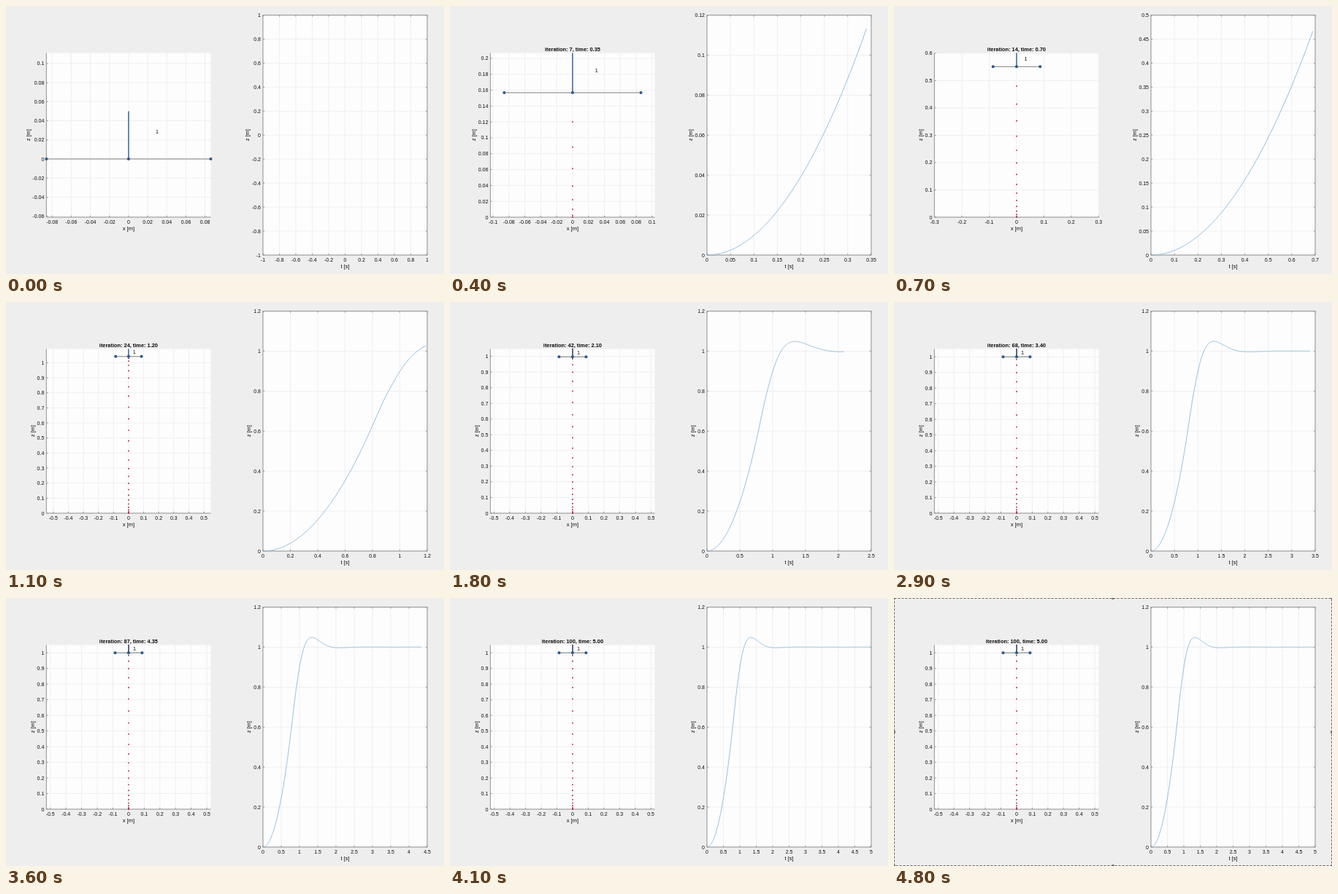
These frames come from a looping animation (600 px wide and 368 px high, 4900 ms). An HTML page with a canvas:

```html
<!DOCTYPE html>
<html lang="en">
<head>
<meta charset="utf-8">
<style>
  html, body { margin: 0; width: 100%; height: 100%; overflow: hidden; background: #eeeeef; }
  canvas { display: block; }
</style>
</head>
<body>
<canvas id="stage" width="600" height="368"></canvas>
<script>
const ctx = document.getElementById('stage').getContext('2d');
const FONT = '"Liberation Sans", Arial, sans-serif';
const DT = 0.05, ARM = 0.086, THRUST = 0.05;
const LEFT = { x0: 55.3, x1: 280.5, y0: 64.5, y1: 290 };
const RIGHT = { x0: 352, x1: 577, y0: 12.5, y1: 342 };

// [picture index, simulation iteration]
const PACE = [[0, 0], [4, 7], [11, 24], [18, 42], [29, 68], [36, 87], [41, 100], [49, 100]];

function iterationAt(i) {
  const k = PACE.findIndex(p => p[0] > i);
  const [a, n] = PACE[k - 1], [b, m] = PACE[k];
  return Math.round(n + (m - n) * (i - a) / (b - a));
}

// Constant thrust first, then a damped swing around 1 m.
function height(t) {
  const climb = 0.98 * t * t;
  const s = 3.4, w = 4.2, d = t - 1.34;
  const settle = 1 + 0.0485 * Math.exp(-s * d) * (Math.cos(w * d) + s / w * Math.sin(w * d));
  const u = Math.min(1, Math.max(0, (t - 0.8) / 0.15));
  const mix = u * u * (3 - 2 * u);
  return climb * (1 - mix) + settle * mix;
}

function niceStep(min) {
  const p = 10 ** Math.floor(Math.log10(min) + 1e-9);
  return [1, 2, 5, 10].map(m => m * p).find(v => v >= min * (1 - 1e-9));
}

function ticks(lo, hi, step) {
  const list = [];
  for (let k = Math.ceil(lo / step - 1e-6); k <= hi / step + 1e-6; k++) list.push(k * step);
  return list;
}

function line(x0, y0, x1, y1, color, width = 1) {
  ctx.strokeStyle = color;
  ctx.lineWidth = width;
  ctx.beginPath();
  ctx.moveTo(x0, y0);
  ctx.lineTo(x1, y1);
  ctx.stroke();
}

function dot(x, y, r, color) {
  ctx.fillStyle = color;
  ctx.beginPath();
  ctx.arc(x, y, r, 0, 7);
  ctx.fill();
}

function text(str, x, y, align = 'center', size = 7, weight = '') {
  ctx.font = `${weight} ${size}px ${FONT}`;
  ctx.textAlign = align;
  ctx.fillStyle = '#0c0c0c';
  ctx.fillText(str, x, y);
}

function drawAxes(box, xlim, ylim, xStep, yStep, xName, boxed) {
  const { x0, x1, y0, y1 } = box;
  const X = v => x0 + (v - xlim[0]) / (xlim[1] - xlim[0]) * (x1 - x0);
  const Y = v => y1 - (v - ylim[0]) / (ylim[1] - ylim[0]) * (y1 - y0);
  const xs = ticks(...xlim, xStep), ys = ticks(...ylim, yStep);
  const ink = '#868686', grid = '#efeff1';
  const tiny = ylim[1] < 0.0099 && boxed;
  const format = v => String(+v.toFixed(4) || 0);

  ctx.fillStyle = '#fdfdfe';
  ctx.fillRect(x0, y0, x1 - x0, y1 - y0);
  xs.forEach(v => line(X(v), y0, X(v), y1, grid));
  ys.forEach(v => line(x0, Y(v), x1, Y(v), grid));
  line(x0, y0, x0, y1, ink, 0.9);
  line(x0, y1, x1, y1, ink, 0.9);
  if (boxed) {
    line(x0, y0, x1, y0, ink, 0.9);
    line(x1, y0, x1, y1, ink, 0.9);
  }

  let widest = 0;
  for (const v of xs) {
    line(X(v), y1, X(v), y1 - 2.3, ink, 0.8);
    if (boxed) line(X(v), y0, X(v), y0 + 2.3, ink, 0.8);
    text(format(v), X(v), y1 + 9.3);
  }
  for (const v of ys) {
    line(x0, Y(v), x0 + 2.3, Y(v), ink, 0.8);
    if (boxed) line(x1, Y(v), x1 - 2.3, Y(v), ink, 0.8);
    const label = format(tiny ? v * 1000 : v);
    text(label, x0 - 3, Y(v) + 2.5, 'right');
    widest = Math.max(widest, ctx.measureText(label).width);
  }
  if (tiny) {
    text('×10', x0, y0 - 3.5, 'left');
    text('-3', x0 + 12.2, y0 - 6, 'left', 5.5);
  }

  text(xName, (x0 + x1) / 2, y1 + 18.4, 'center', 7.5);
  ctx.save();
  ctx.translate(x0 - 6.8 - widest, (y0 + y1) / 2);
  ctx.rotate(-Math.PI / 2);
  text('z [m]', 0, 0, 'center', 7.5);
  ctx.restore();
  return [X, Y];
}

function drawScene(n) {
  const z = n ? height((n + 1) * DT) : 0;
  const top = z + THRUST, span = Math.max(top, 2 * ARM);
  const low = (top - span) / 2;
  const step = niceStep(span * 20 / 225.5);
  const [X, Y] = drawAxes(LEFT, [-span / 2, span / 2], [low, low + span], step, step, 'x [m]', false);
  const cx = X(0), cy = Y(z);

  if (n) {
    for (let k = 0; k <= n; k++) {
      const y = Y(height(k * DT));
      if (y >= LEFT.y0) dot(cx, y, 0.95, '#bd2638');
    }
    text(`iteration: ${n}, time: ${(n * DT).toFixed(2)}`, cx, 61.7, 'center', 7.4, 'bold');
  }
  line(X(-ARM), cy, X(ARM), cy, '#707070', 0.9);
  line(cx, cy, cx, Y(top), '#3d72a4', 1.6);
  for (const x of [-ARM, 0, ARM]) {
    dot(X(x), cy, 2, '#294f78');
    dot(X(x), cy, 1.2, '#245f9e');
  }
  text('1', X(0.0283), Y(z + 0.0283) + 2.5, 'left', 7.2);
}

function drawHistory(n) {
  if (!n) {
    drawAxes(RIGHT, [-1, 1], [-1, 1], 0.2, 0.2, 't [s]', true);
    return;
  }
  const end = n * DT - 0.01;
  const times = [];
  for (let t = 0; t <= end + 1e-6; t += 0.01) times.push(t);
  const fit = max => {
    let step = niceStep(max / 10);
    if (Math.ceil(max / step - 1e-6) > 10) step = niceStep(step * 1.01);
    return [step, Math.ceil(max / step - 1e-6) * step];
  };
  const [xStep, xMax] = fit(end);
  const [yStep, yMax] = fit(Math.max(...times.map(height)));
  const [X, Y] = drawAxes(RIGHT, [0, xMax], [0, yMax], xStep, yStep, 't [s]', true);
  ctx.strokeStyle = '#7fb0d0';
  ctx.lineWidth = 0.8;
  ctx.beginPath();
  times.forEach(t => ctx.lineTo(X(t), Y(height(t))));
  ctx.stroke();
}

function drawSelection() {
  ctx.strokeStyle = '#666';
  ctx.lineWidth = 1;
  ctx.setLineDash([3, 2]);
  ctx.strokeRect(0.5, 0.5, 599, 367);
  ctx.setLineDash([]);
  for (const x of [0, 300, 600])
    for (const y of [0, 184, 368])
      if (x !== 300 || y !== 184) dot(x, y, 2, '#666');
}

function draw(now) {
  const i = Math.floor(now % 4900 / 100);
  const n = iterationAt(i);
  ctx.fillStyle = '#eeeeef';
  ctx.fillRect(0, 0, 600, 368);
  drawScene(n);
  drawHistory(n);
  if (i === 48) drawSelection();
}

const start = performance.now();
function loop() {
  draw(performance.now() - start);
  requestAnimationFrame(loop);
}
loop();
</script>
</body>
</html>
```
